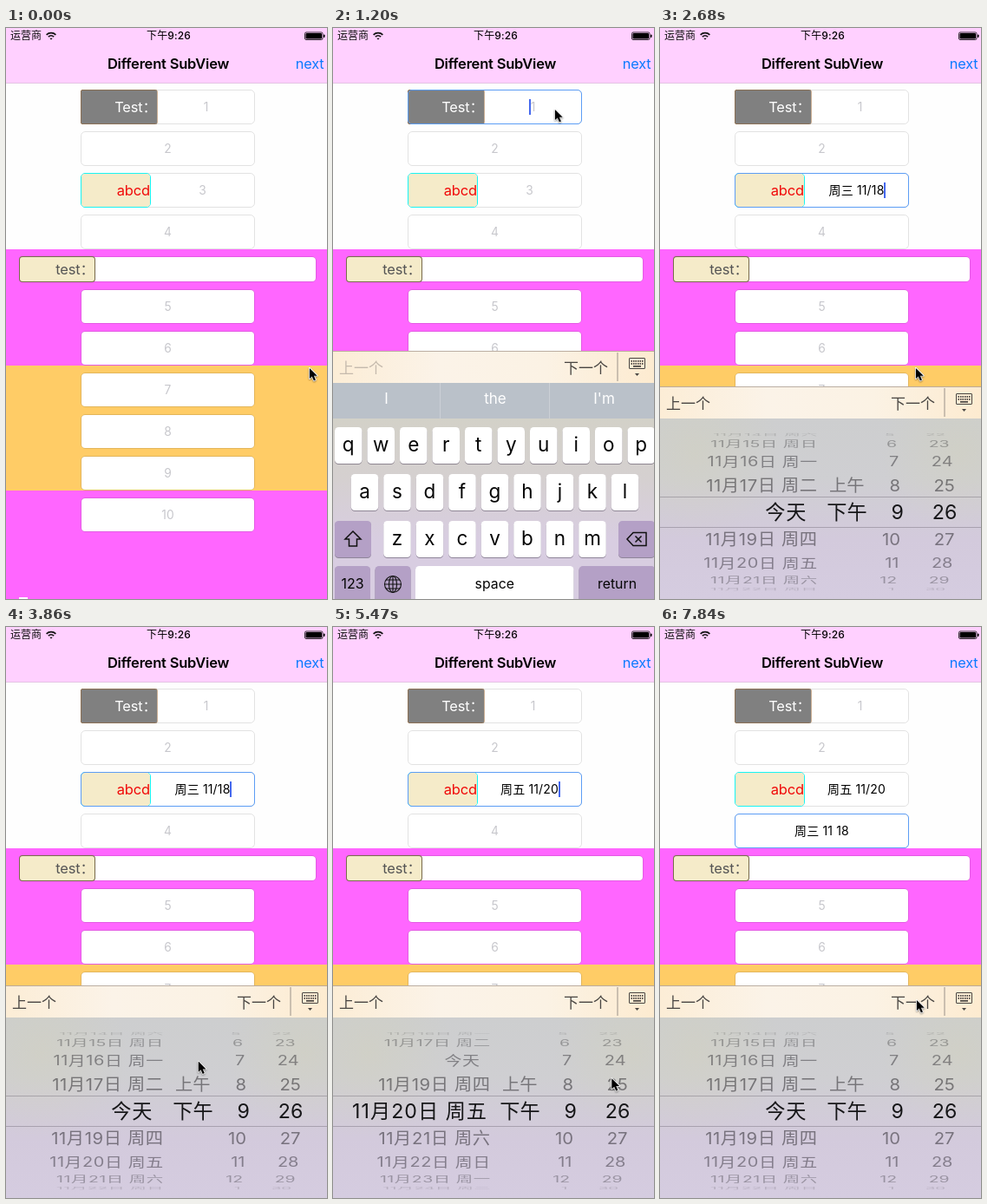
An HTML page with a canvas that plays this animation: 370 px wide and 658 px high, repeating every 7.99 s.

```html
<!DOCTYPE html>
<html lang="zh-CN">
<head>
<meta charset="utf-8">
<title>Different SubView</title>
<style>
html, body { margin: 0; width: 100%; height: 100%; overflow: hidden; background: #fff; }
canvas { display: block; width: 370px; height: 658px; }
</style>
</head>
<body>
<canvas id="stage"></canvas>
<script>
const W = 370, H = 658, LOOP = 7990, STEP = 147.9, LAST = 53;
const FONT = 'Inter, "Noto Sans CJK SC", "Noto Sans CJK", sans-serif';
const BLUE = '#5c9df5', CREAM = '#f5ebc9', CARET = '#4468ee', INK = '#111', DARK_KEY = '#b4a0c6';
const canvas = document.getElementById('stage');
const dpr = window.devicePixelRatio || 1;
canvas.width = W * dpr;
canvas.height = H * dpr;
const c = canvas.getContext('2d');

// Step at which each field takes focus; index 0 means none.
const FOCUS = [0, 5, 13, 18, 49];

// Where the pointer rests or turns: [step, x, y].
const STOPS = [
  [0, 349, 391], [6, 255, 93], [8, 255, 93], [12, 287, 396], [15, 294, 391], [21, 294, 391],
  [29, 187, 550], [32, 143, 513], [37, 341, 520], [41, 340, 580], [44, 306, 440], [47, 295, 429]
];

function ramp(k, from, to) {
  const u = Math.min(1, Math.max(0, (k - from) / (to - from)));
  return u * u * (3 - 2 * u);
}

function pointerAt(k) {
  let [, x, y] = STOPS[0];
  for (let i = 1; i < STOPS.length; i++) {
    const [t0, x0, y0] = STOPS[i - 1], [t1, x1, y1] = STOPS[i];
    const u = ramp(k, t0, t1);
    x += (x1 - x0) * u;
    y += (y1 - y0) * u;
  }
  return [x, y];
}

function stateAt(k) {
  const focus = FOCUS.filter(t => t <= k).length - 1;
  const pressed = FOCUS.indexOf(k + 1) > 1;
  const scrolled = k >= 36;
  const steady = focus === 3 && k > 31;
  return {
    k, focus, pressed, scrolled,
    caret: !pressed && (steady || (k - FOCUS[focus]) % 7 < 4),
    day: focus === 4 ? 18 : 18 + 2 * ramp(k, 30, 36),
    minute: focus === 4 ? 26 : 26 - 2 * ramp(k, 38, 42),
    sink: 286 * Math.max(0, 1 - (k - 5) / 2.2) ** 1.28
  };
}

function text(s, x, y, size, color, align = 'center', weight = 400, track = 0) {
  c.font = `${weight} ${size}px ${FONT}`;
  c.letterSpacing = track + 'px';
  c.textAlign = align;
  c.fillStyle = color;
  c.fillText(s, x + (align === 'right' ? track : 0), y + size * 0.365);
}

function rect(x, y, w, h, color) {
  c.fillStyle = color;
  c.fillRect(x, y, w, h);
}

function paint(fill, stroke, line) {
  if (stroke) { c.strokeStyle = stroke; c.lineWidth = line; c.stroke(); }
  if (fill) { c.fillStyle = fill; c.fill(); }
}

function box(x, y, w, h, r, fill, stroke, line = 1) {
  c.beginPath();
  c.roundRect(x, y, w, h, r);
  paint(fill, stroke, line);
}

function path(points, fill, stroke, line = 1) {
  c.beginPath();
  points.forEach(([x, y]) => c.lineTo(x, y));
  c.closePath();
  paint(fill, stroke, line);
}

function arc(x, y, rx, ry, from, to, line) {
  c.beginPath();
  c.ellipse(x, y, rx, ry, 0, from, to);
  paint(null, INK, line);
}

function gradient(x, y, ...colors) {
  const g = c.createLinearGradient(0, y[0], x, y[1]);
  colors.forEach((color, i) => g.addColorStop(i / (colors.length - 1), color));
  return g;
}

function statusBar() {
  rect(0, 0, W, 63, '#ffd0ff');
  rect(0, 63, W, 1, '#e3c3e3');
  text('运营商', 5, 9, 12, INK, 'left');
  text('下午9:26', 187.5, 9, 12, '#000', 'center', 500, 0.1);
  for (const r of [4.4, 7.6]) arc(52, 13.2, r, r, -Math.PI * 0.75, -Math.PI * 0.25, 1.7);
  path([[50.3, 11.7], [53.7, 11.7], [52, 13.5]], '#000');
  box(344.5, 5, 20.5, 8.5, 1.5, null, '#000', 0.8);
  box(345.5, 6, 18.5, 6.5, 1, '#000');
  box(366, 7.5, 1.5, 3.5, 0.7, '#000');
  text('Different SubView', 187, 41, 16.5, '#000', 'center', 600, -0.2);
  text('next', 366.5, 41, 16.3, '#0a7aff', 'right', 400, -0.2);
}

function frame(x, y, w, h) {
  box(x + 0.5, y + 0.5, w - 1, h - 1, 4, '#fff');
  box(x, y, w, h, 5, null, 'rgba(0,0,0,.11)');
}

function field(n, s) {
  const y = 71.5 + (n - 1) * 48 + (n > 4 ? 38 : 0);
  const mid = y + 19.5, on = s.focus === n;
  const cx = n === 1 ? 230.5 : n === 3 ? 226.5 : 186.5;
  frame(86.5, y, 200, 39);
  if (n === 1) {
    box(86.5, y, 87.5, 39, 1.5, '#808080', '#98612a');
    text('Test：', 174, mid, 16.4, '#fff', 'right', 400, -0.1);
  }
  if (n === 3) {
    box(86.5, y, 80, 39, 4.5, null, '#18f4f4');
    box(87, y + 0.5, 79, 38, 4, CREAM);
    text('abcd', 166, mid, 16.5, '#f00a0a', 'right', 400, -0.2);
  }
  if (on) box(86.5, y, 200, 39, 4.5, null, BLUE);

  const value = n > s.focus ? ''
    : n === 3 ? (s.scrolled ? '周五 11/20' : '周三 11/18')
    : n === 4 ? '周三 11 18' : '';
  if (value) text(value, cx, mid, 14, '#000', 'center', 400, 0.15);
  else text(n, cx, mid, 13.8, '#c7c7cc');
  if (on && s.caret) {
    const half = value ? c.measureText(value).width / 2 : -5;
    rect(Math.round(cx + half), mid - 9, 2, 18, CARET);
  }
}

function content(s) {
  rect(0, 64, W, 191, '#fefefe');
  rect(0, 255, W, 403, '#ff66ff');
  rect(0, 389, W, 144, '#ffcc66');
  rect(15, 656, 10, 2, '#fff');
  for (let n = 1; n <= 10; n++) field(n, s);
  frame(15.5, 263.5, 342, 29);
  box(16, 264, 86, 28, 3, CREAM, '#776a4c', 2);
  text('test：', 102, 278, 16.4, '#555', 'right', 400, -0.1);
}

function toolbar(y, s) {
  rect(0, y, W, 37, gradient(W, [0, 0], '#fcedd6', '#fbf3e8', '#fbf2e4', '#fdebd0'));
  rect(0, y, W, 1, 'rgba(90,70,60,.4)');
  const dim = '#c5baad', ink = '#484542';
  text('上一个', 7, y + 19.5, 17, s.focus === 1 && !s.pressed ? dim : ink, 'left');
  text('下一个', 266, y + 19.5, 17, s.pressed ? dim : ink, 'left');
  rect(327.5, y + 2, 1, 33, '#99928a');
  box(341.5, y + 8.5, 18, 12, 0.5, null, ink);
  for (let i = 0; i < 12; i++) rect(343.5 + (i % 6) * 2.5, y + 11 + (i > 5) * 3, 1.5, 1.8, ink);
  rect(346, y + 17, 9, 1.7, ink);
  path([[348, y + 26], [353, y + 26], [350.5, y + 29]], ink);
}

function key(x, y, w, label, size = 22.5, fill = '#fff') {
  box(x, y + 1, w, 42, 4.5, 'rgba(95,85,105,.6)');
  box(x, y, w, 42, 4.5, fill);
  text(label, x + w / 2, y + 20, size, '#050505');
}

function keyIcons() {
  path([[23, 580], [32, 589], [27.5, 589], [27.5, 597], [18.5, 597], [18.5, 589], [14, 589]], null, INK, 1.5);
  path([[339, 589], [346, 581.5], [361, 581.5], [361, 596.5], [346, 596.5]], null, INK, 1.5);
  for (const d of [-3.5, 3.5]) path([[352 - d, 589 - 3.5], [352 + d, 589 + 3.5]], null, INK, 1.5);
  for (const rx of [0, 4.5, 9.5]) arc(69, 641, rx, 9.5, 0, Math.PI * 2, 1.1);
  for (const d of [-5, 0, 5]) {
    const w = Math.sqrt(9.5 ** 2 - d * d);
    path([[69 - w, 641 + d], [69 + w, 641 + d]], null, INK, 1.1);
  }
}

function keyboard(s) {
  c.save();
  c.translate(0, s.sink);
  rect(0, 408, W, 250, gradient(0, [450, 590], '#d3d1c8', '#d5d0d0', '#d8cde1'));
  rect(0, 408, W, 42, '#bac1c9');
  ['I', 'the', "I'm"].forEach((word, i) => {
    text(word, 61.5 + i * 125.5, 427, 17, '#fff');
    if (i) rect(i * 126 - 3, 408, 1, 42, '#cbd0d6');
  });
  ['qwertyuiop', 'asdfghjkl', 'zxcvbnm'].forEach((row, r) => {
    const left = 186.5 - row.length * 18.75 + 3;
    [...row].forEach((ch, i) => key(left + i * 37.5, 460 + r * 54, 31.5, ch));
  });
  key(2, 568, 42, '', 0, DARK_KEY);
  key(329, 568, 42, '', 0, DARK_KEY);
  key(2, 620, 41, '123', 16, DARK_KEY);
  key(48.5, 620, 41, '', 0, DARK_KEY);
  key(95, 620, 182.5, 'space', 15.8);
  key(283.5, 620, 88, 'return', 15.8, DARK_KEY);
  keyIcons();
  toolbar(372, s);
  c.restore();
}

const wrap = (v, n) => ((v % n) + n) % n;
const dayName = d => d === 18 ? '今天' : `11月${d}日 周${'日一二三四五六'[wrap(d - 1, 7)]}`;

function clipped(areas, drawRows) {
  c.save();
  c.beginPath();
  areas.forEach(([y, h]) => c.rect(0, y, W, h));
  c.clip();
  drawRows();
  c.restore();
}

// Rows lie on a cylinder 20 degrees apart; the middle band shows them flat and larger.
function wheel(pos, label, align, rowX, midX, track = 0) {
  const R = 90.5, cy = 558, first = Math.floor(pos);
  clipped([[450, 90], [576, 82]], () => {
    for (let i = first - 4; i <= first + 5; i++) {
      const a = (i - pos) * Math.PI / 9, s = label(i), cos = Math.cos(a);
      if (cos < 0.09 || !s) continue;
      const p = 900 / (900 + R * (1 - cos));
      c.save();
      c.translate(185 + (rowX(i) - 185) * p, cy + R * Math.sin(a));
      c.scale(p, p * cos);
      text(s, 0, 0, 20.4, `rgba(20,18,24,${0.5 * cos ** 0.7})`, align, 400, track * 0.6);
      c.restore();
    }
  });
  clipped([[541, 34]], () => {
    for (let i = first; i <= Math.ceil(pos); i++) {
      const s = label(i);
      if (s) text(s, midX(i), cy + (i - pos) * 32, 23.2, '#161618', align, 400, track);
    }
  });
}

function glow(x, y, r) {
  const g = c.createRadialGradient(x, y, 0, x, y, r);
  g.addColorStop(0, 'rgba(216,214,160,.2)');
  g.addColorStop(1, 'rgba(216,214,160,0)');
  rect(0, 450, W, 208, g);
}

function picker(s) {
  rect(0, 450, W, 208, gradient(0, [450, 658], '#cdcecf', '#cfcfd2', '#d3cadc', '#d5cce0'));
  glow(40, 490, 100);
  glow(345, 490, 90);
  for (const y of [540, 575]) rect(0, y, W, 1, 'rgba(90,85,95,.35)');
  const today = d => d === 18;
  wheel(s.day, dayName, 'right', d => today(d) ? 168.5 : 181, d => today(d) ? 168.5 : 177, 1);
  wheel(1, i => ['上午', '下午'][i], 'center', () => 215.5, () => 215.5);
  wheel(9, i => String(wrap(i - 1, 12) + 1), 'right', () => 277.5, () => 281);
  wheel(s.minute, i => String(wrap(i, 60)).padStart(2, '0'), 'center', () => 328.5, () => 328);
  toolbar(413, s);
}

function pointer([x, y]) {
  c.save();
  c.translate(x, y);
  c.scale(0.9, 0.9);
  c.lineJoin = 'round';
  c.shadowColor = 'rgba(0,0,0,.3)';
  c.shadowBlur = 2;
  c.shadowOffsetY = 1;
  const arrow = [[1, 1], [1, 14.5], [4.2, 11.6], [6.5, 17], [8.8, 16], [6.5, 10.8], [10.8, 10.8]];
  path(arrow, '#fff', '#fff', 2);
  c.shadowColor = 'transparent';
  path(arrow, '#000');
  c.restore();
}

function draw(now) {
  const k = Math.min(LAST, Math.floor(now % LOOP / STEP));
  const s = stateAt(k);
  c.setTransform(dpr, 0, 0, dpr, 0, 0);
  content(s);
  statusBar();
  if (s.focus > 2) picker(s);
  else if (s.focus) keyboard(s);
  pointer(pointerAt(k));
}

const start = performance.now();
function tick() {
  draw(performance.now() - start);
  requestAnimationFrame(tick);
}
tick();
</script>
</body>
</html>
```
